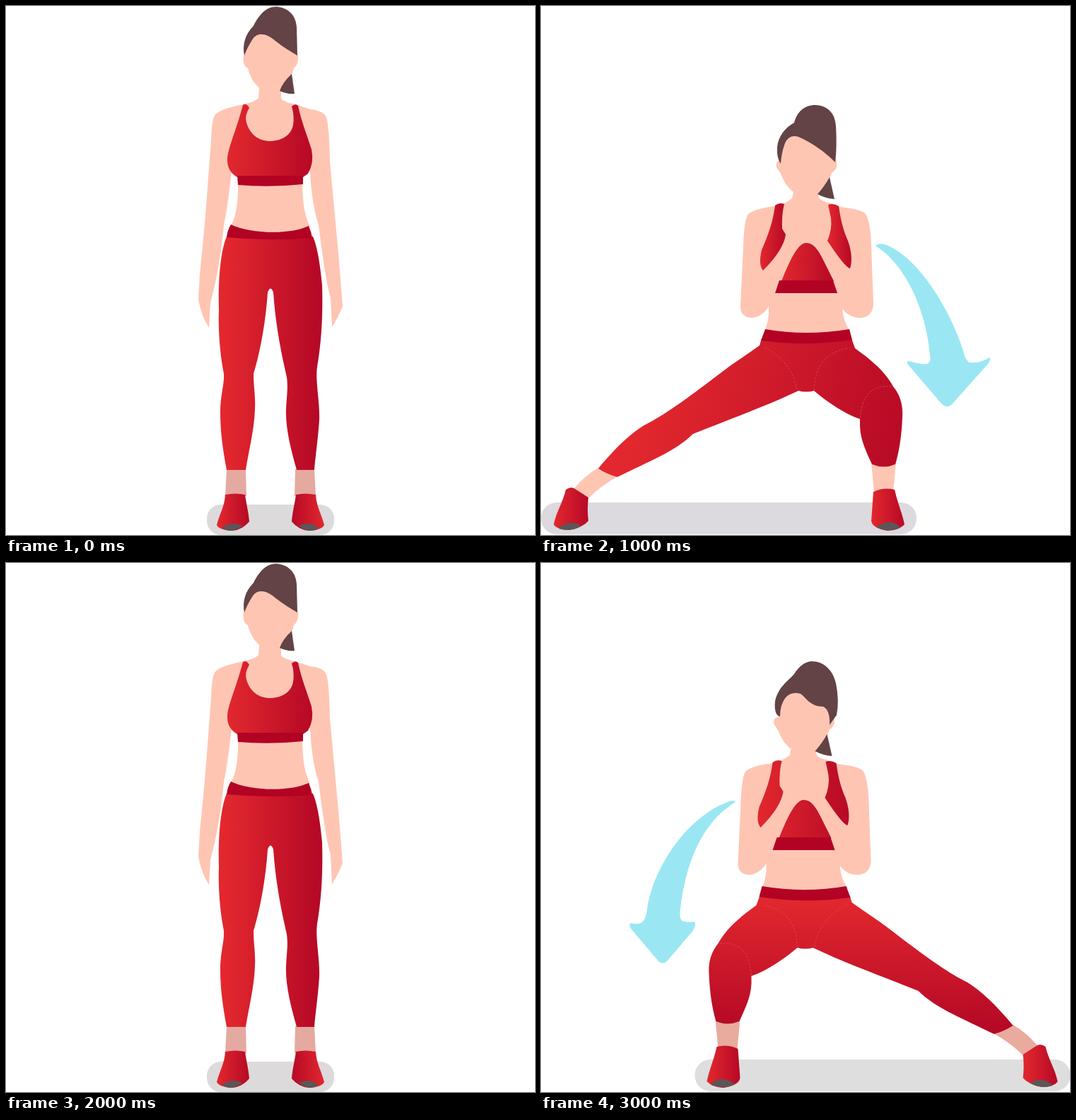
Write an HTML page that moves like this. It is 748x748 px and loops after 4 s.

```html
<!DOCTYPE html>
<html lang="en">
<head>
<meta charset="utf-8">
<title>Side lunge</title>
<style>
  html, body { margin: 0; width: 100%; height: 100%; overflow: hidden; background: #fff; }
  svg { display: block; width: 100%; height: 100%; }
  .skin { fill: #ffc5b3; }
  .hair { fill: #634345; }
  .band { fill: #b20325; }
  .toe { fill: #5b5658; }
  .arrow { fill: #9ae7f3; }
  .seam { fill: none; stroke: #e0575a; stroke-width: 1; stroke-dasharray: 3 2; opacity: .65; }
  .top { fill: var(--top); }
  .shoe { fill: var(--shoe); }
  .pants { fill: var(--pants); }
  .sock { fill: var(--sock); }
  .mat { fill: var(--mat); }
  svg { --top: url(#across); --shoe: url(#across); }
  #stand { --pants: url(#standing); --sock: #e4a9a0; --mat: #dcdadb; }
  #right { --pants: url(#sideways); --sock: #ffc5b3; --mat: #dcdade; }
  #left { --top: url(#chest); --shoe: url(#back); --pants: url(#downward); --sock: #e8ab9d; --mat: #dedede; }
</style>
</head>
<body>
<svg viewBox="0 0 748 748">
  <defs>
    <linearGradient id="across">
      <stop stop-color="#e2282e"/><stop offset="1" stop-color="#b60926"/>
    </linearGradient>
    <linearGradient id="back" href="#across" x1="1" x2="0"/>
    <linearGradient id="chest" href="#across" gradientUnits="userSpaceOnUse" x1="310" x2="440"/>
    <linearGradient id="standing" href="#across" gradientUnits="userSpaceOnUse" x1="310" x2="440"/>
    <linearGradient id="sideways" href="#across" gradientUnits="userSpaceOnUse" x1="150" y1="540" x2="520" y2="640"/>
    <linearGradient id="downward" href="#across" gradientUnits="userSpaceOnUse" x1="0" y1="475" x2="0" y2="655"/>

    <g id="foot">
      <path class="sock" d="M312 655H339L340 693H310Z"/>
      <path class="shoe" d="M310 691Q325 688 338 691C340 705 343 716 344 729Q334 741 320 742Q302 741 298 734C302 718 309 708 310 691Z"/>
      <path class="toe" d="M306 738Q313 732 321 732Q329 732 334 735Q325 742 318 742Q311 742 306 738Z"/>
    </g>

    <g id="lungeTop">
      <path class="skin" d="M344 185L339 218Q331 219 333 228L339 237Q345 254 357 263L355 272Q345 280 331 283Q298 287 292 296Q287 305 286 340L282 425Q282 440 298 441Q312 440 322 425V435Q321 448 316 460Q375 470 437 460Q427 445 426 428Q436 441 452 441Q470 439 470 420L467 340Q466 305 459 294Q452 287 421 284L407 278Q393 276 392 267Q406 252 411 236Q420 230 418 221L414 205L365 175Z"/>
      <path class="hair" d="M408 242L415 273Q402 272 391 266Q401 255 408 242Z"/>
      <path class="top" d="M331 282Q337 277 344 280Q340 295 341 315L346 323Q343 345 314 374Q307 366 312 345C322 322 328 305 331 282Z"/>
      <path class="top" d="M406 281Q413 278 421 283C424 305 428 318 434 332Q442 355 437 371Q430 370 405 332Q412 315 410 300Z"/>
      <path class="top" d="M375 335C386 335 393 347 398 357L414 389H340C350 365 362 335 375 335Z"/>
      <path class="band" d="M337 388H413L419 406H331Z"/>
    </g>

    <g id="lungeLegs">
      <rect class="mat" y="702" width="531" height="45" rx="22"/>
      <path class="sock" d="M81 653L109 665Q85 678 67 696L47 682Q62 664 81 653ZM467 645H502L498 687L471 688Z"/>
      <path class="pants" d="M312 470H439L444 484C462 497 485 514 498 538C508 550 512 565 511 580C510 612 505 635 501 648Q485 655 468 648C460 630 452 615 451 595V584C428 576 405 560 386 544Q375 547 364 544C320 565 265 585 215 605C190 630 150 645 108 666Q93 662 81 654C105 625 130 600 155 588C190 569 240 529 270 507Q295 490 309 480Z"/>
      <path class="seam" d="M316 483C340 495 358 515 362 544M433 484C405 490 388 505 386 543M496 538Q470 536 460 552Q452 565 451 585"/>
      <path class="band" d="M317 457Q375 467 436 457L440 472Q375 482 311 473Z"/>
      <path class="shoe" d="M35 684Q43 678 50 684L67 695Q65 712 67 728Q60 737 40 741Q22 740 18 733C22 714 31 702 35 684Z"/>
      <path class="shoe" d="M470 687Q485 680 500 684C504 702 510 715 514 733Q505 742 490 742Q468 738 467 728Z"/>
      <path class="toe" d="M25 739Q32 731 42 731Q54 731 56 736Q42 744 25 739ZM474 737Q485 729 495 730Q505 732 508 738Q490 745 474 737Z"/>
    </g>
  </defs>

  <g id="stand">
    <rect class="mat" x="284" y="705" width="180" height="43" rx="20"/>
    <path class="skin" d="M342 45L336 70Q334 85 342 88Q346 105 358 116L357 130Q352 136 335 139L325 240H328C329 280 325 300 317 312Q373 330 430 312C422 295 419 280 419 240L413 140Q389 135 389 130V120Q403 105 407 88Q414 82 413 70L400 50L360 30Z"/>
    <path class="hair" d="M404 96L408 124Q397 125 387 120Q391 108 404 96Z"/>
    <path class="skin" d="M336 139Q300 146 295 155Q291 162 290 190L284 270C282 300 278 340 274 380L272 415Q276 438 287 455L289 420C300 380 305 340 308 310C314 280 317 250 319 235L345 180Z"/>
    <path class="skin" d="M412 140L430 146Q450 148 453 158Q457 170 458 220L470 350L476 424Q470 440 461 454L459 412C452 390 446 340 442 310C436 290 432 270 430 235L400 180Z"/>
    <path class="hair" d="M337 70C334 55 338 40 350 28C358 12 368 1 382 1C398 2 410 12 411 30L412 70C395 60 388 55 378 47C368 39 355 36 348 48C343 56 340 62 337 70Z"/>
    <path class="top" d="M335 140Q340 137 344 144Q337 155 340 165C345 182 358 191 373 191C390 191 404 182 406 168Q408 155 404 142Q409 137 413 141C418 165 425 180 432 203Q436 222 427 237L420 242H327Q313 234 313 218C313 202 325 178 335 140Z"/>
    <path class="band" d="M327 240H420V252Q373 257 328 253Z"/>
    <use href="#foot"/>
    <use href="#foot" transform="matrix(-1 0 0 1 748 0)"/>
    <path class="pants" d="M312 326H434C442 345 445 375 447 395C448 430 447 470 440 510C437 530 444 560 443 585C441 615 437 640 436 656H411C402 625 395 595 396 570C397 550 399 540 397 525C389 490 381 450 378 405Q374 394 370 405C367 450 359 490 350 520C350 540 353 550 352 570C351 600 343 630 339 656H312C306 625 303 600 303 575C303 550 309 535 308 520C302 490 300 455 301 430C300 395 302 350 312 326Z"/>
    <path class="band" d="M318 309C345 322 400 324 428 311Q432 320 433 328Q373 333 312 327Q313 317 318 309Z"/>
  </g>

  <g id="right">
    <use href="#lungeTop"/>
    <path class="hair" d="M339 223Q333 215 334 200C335 185 345 172 358 165C362 150 372 140 388 140C406 141 416 152 417 170C418 188 418 205 416 221C402 207 385 194 364 185Q351 181 345 194Q340 207 339 223Z"/>
    <use href="#lungeLegs"/>
    <path class="arrow" d="M473 339Q478 334 489 338C530 355 575 420 597 487Q598 497 605 504Q620 506 634 497Q637 499 632 506L583 561Q575 571 566 562L519 507Q515 500 524 503Q535 507 546 506Q552 503 550 495C545 430 515 365 473 339Z"/>
  </g>

  <g id="left">
    <use href="#lungeTop" x="-3.5"/>
    <path class="hair" d="M338 217Q329 215 331 195C336 175 348 168 358 157C365 145 375 139 383 139C400 139 413 152 417 170Q422 195 418 215L408 229Q409 208 399 203C380 203 375 190 367 185Q355 181 346 190Q338 200 338 217Z"/>
    <use href="#lungeLegs" transform="matrix(-1 0 0 1 748.5 0)"/>
    <path class="arrow" d="M275 338Q272 334 264 338C210 358 160 425 150 490Q148 504 143 508Q135 512 127 509Q123 512 128 518L166 563Q172 569 179 562L214 521Q220 512 217 507Q208 509 199 506Q195 500 197 490C205 420 230 365 275 338Z"/>
  </g>
</svg>
<script>
  const HOLD = 1000;
  const order = ["stand", "right", "stand", "left"];
  const poses = ["stand", "right", "left"].map(id => document.getElementById(id));
  const start = performance.now();

  function draw(now) {
    const step = Math.floor(Math.max(0, now - start) / HOLD) % order.length;
    for (const pose of poses) pose.style.display = pose.id === order[step] ? "" : "none";
    requestAnimationFrame(draw);
  }
  draw(start);
</script>
</body>
</html>
```
